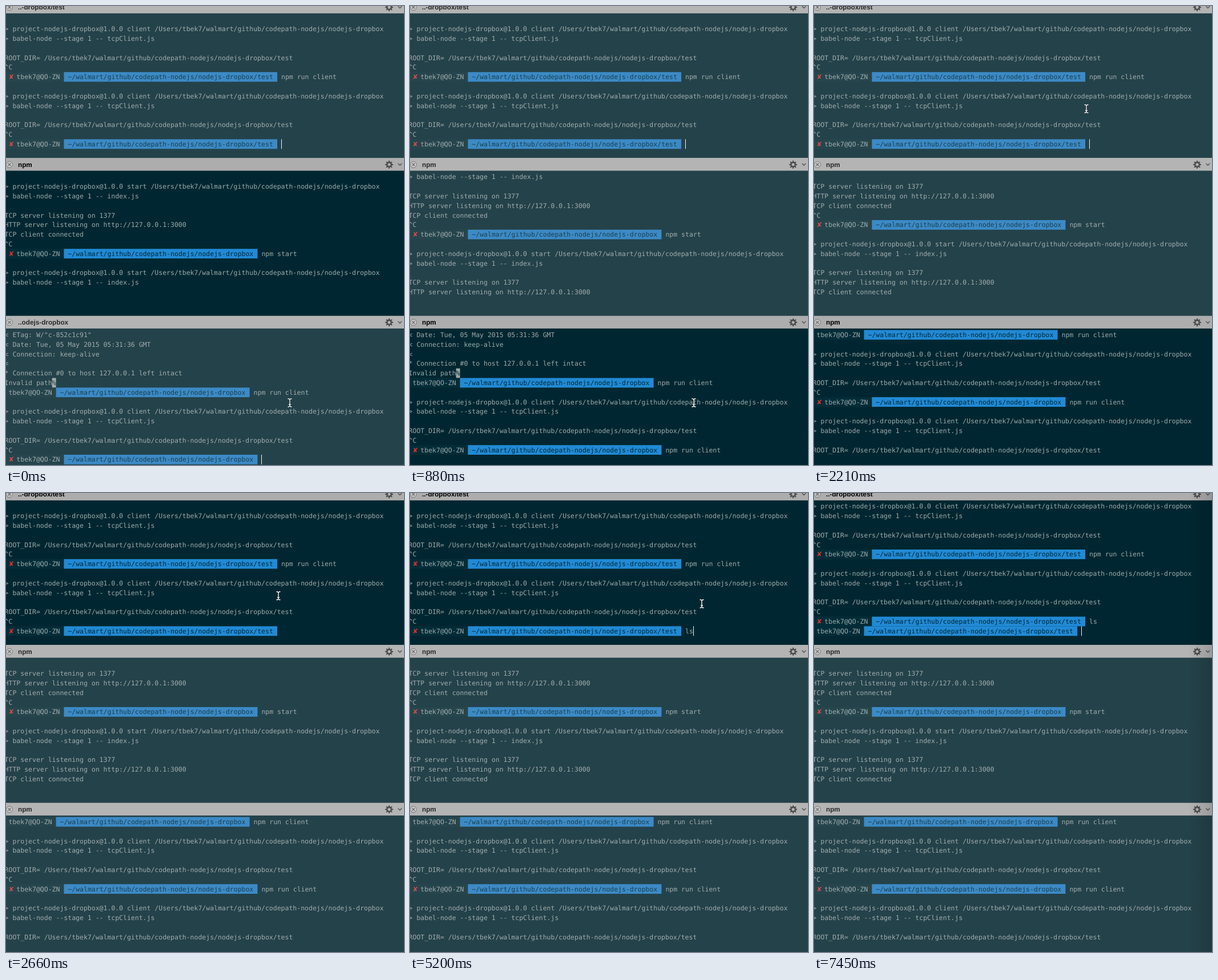
Recreate the animation shown at these times as an HTML page with a canvas. Size 697 by 804 pixels, loop 8000 ms.

```html
<!DOCTYPE html>
<html lang="en">
<head>
<meta charset="utf-8">
<title>Terminal panes</title>
<style>
html, body { margin: 0; width: 100%; height: 100%; overflow: hidden; background: #24424a; }
canvas { display: block; }
</style>
</head>
<body>
<canvas id="stage" width="697" height="804"></canvas>
<script>
const ctx = document.getElementById('stage').getContext('2d');
const W = 697, H = 804, LOOP = 8000;
const CELL = 6.92, LEFT = -2.4, ROW = 16.8, ROWS = 14;
const MONO = '11.494px "DejaVu Sans Mono", monospace';
const SYMBOL = '11.5px "DejaVu Sans", sans-serif';
const TITLE = 'bold 11.75px "Liberation Sans", Arial, sans-serif';

const ACTIVE = { bg: '#002731', user: '#022d38', text: '#9ba8a8', blue: '#218ad5', path: '#002a38', red: '#e32f2b', bar: '#adadad', title: '#000' };
const IDLE = { bg: '#24424a', user: '#26454d', text: '#a0acac', blue: '#3c8ac6', path: '#1a404f', red: '#d54a46', bar: '#b4b4b4', title: '#2a2a2a' };

const USER = 'tbek7@QO-ZN';
const REPO = '/walmart/github/codepath-nodejs/nodejs-dropbox';
const HOME = '/Users/tbek7';
const PATH = '~' + REPO;
const ROOT = `ROOT_DIR= ${HOME}${REPO}/test`;

const prompt = (failed, path, cmd = '') => ({ failed, path, cmd });
const run = (script, file) => ['', `> project-nodejs-dropbox@1.0.0 ${script} ${HOME}${REPO}`, `> babel-node --stage 1 -- ${file}`, ''];
const client = run('client', 'tcpClient.js');
const server = run('start', 'index.js');
const listening = ['TCP server listening on 1377', 'HTTP server listening on http://127.0.0.1:3000'];
const connected = 'TCP client connected';

// Latest entry whose time has been reached.
const at = (steps, t) => steps.reduce((found, step) => step[0] <= t ? step : found);

function topLines(t) {
  const typed = at([[0, ''], [5060, 'l'], [5200, 'ls']], t)[1];
  const lines = [...client, ROOT, '^C', prompt(true, PATH + '/test', 'npm run client'),
    ...client, ROOT, '^C', prompt(true, PATH + '/test', typed)];
  if (t >= 5950) lines.push(prompt(false, PATH + '/test'));
  return lines;
}

function middleLines(t) {
  const lines = [...server, ...listening, connected, '^C', prompt(true, PATH, 'npm start'), ...server];
  if (t >= 880) lines.push(...listening);
  if (t >= 2210) lines.push(connected);
  return [...lines, ''];
}

function bottomLines(t) {
  const lines = ['< ETag: W/"c-852c1c91"', '< Date: Tue, 05 May 2015 05:31:36 GMT', '< Connection: keep-alive', '<',
    '* Connection #0 to host 127.0.0.1 left intact', { text: 'Invalid path', mark: '%' },
    prompt(false, PATH, 'npm run client'), ...client, ROOT, '^C',
    prompt(true, PATH, t >= 440 ? 'npm run client' : '')];
  if (t >= 1330) lines.push(...client);
  if (t >= 2210) lines.push(ROOT);
  if (t >= 880) lines.push('');
  return lines;
}

const panes = [
  { top: 0, bottom: 266, barY: 2.2, firstRow: 23.4, lines: topLines, title: () => '..-dropbox/test',
    active: t => t >= 2660, caret: t => t < 2660 || t >= 3260 && t < 4310 || t >= 5060 },
  { top: 277, bottom: 543, barY: 277.8, firstRow: 299.4, lines: middleLines, title: () => 'npm',
    active: t => t < 290, caret: () => false },
  { top: 554, bottom: H, barY: 554.2, firstRow: 576, lines: bottomLines, title: t => t < 880 ? '..odejs-dropbox' : 'npm',
    active: t => t >= 290 && t < 2660, caret: t => t < 290 || t >= 440 && t < 880 }
];

const pointerSteps = [
  [0, 497, 695], [1330, 497, 660], [1480, 414, 306], [1770, 411, 185], [1920, 419, 128],
  [2060, 461, 144], [2210, 477, 180], [2960, 527, 183], [3110, 570, 195], [3260, 592, 216],
  [3560, 571, 213], [3710, 511, 194], [6400, 520, 193], [6550, 634, 191], [6700, -50, -50]
];

const colX = col => LEFT + col * CELL;

function rect(color, x, y, w, h) {
  ctx.fillStyle = color;
  ctx.fillRect(x, y, w, h);
}

function write(text, col, y, color, font = MONO) {
  ctx.font = font;
  ctx.fillStyle = color;
  ctx.fillText(text, colX(col), y + 4);
}

// Draws one row and returns the column after its last character.
function drawLine(line, y, look) {
  const top = y - ROW / 2;
  if (typeof line === 'string') {
    write(line, 0, y, look.text);
    return line.length;
  }
  if (line.mark) {
    const col = line.text.length;
    write(line.text, 0, y, look.text);
    rect(look.text, colX(col), top, CELL, ROW);
    write(line.mark, col, y, look.bg);
    return col + 1;
  }
  const userCol = line.failed ? 3 : 1;
  const blueCol = userCol + USER.length + 1;
  const blueLen = line.path.length + 2;
  const cmdCol = blueCol + blueLen + 1;
  rect(look.user, 0, top, colX(blueCol), ROW);
  if (line.failed) write('✘', 1, y, look.red, SYMBOL);
  write(USER, userCol, y, look.text);
  rect(look.blue, colX(blueCol), top, blueLen * CELL, ROW);
  write(line.path, blueCol + 1, y, look.path);
  write(line.cmd, cmdCol, y, look.text);
  return cmdCol + line.cmd.length;
}

function stroke(color, width, ...points) {
  ctx.strokeStyle = color;
  ctx.lineWidth = width;
  ctx.beginPath();
  points.forEach(([x, y], i) => i ? ctx.lineTo(x, y) : ctx.moveTo(x, y));
  ctx.stroke();
}

function drawGear(x, y) {
  for (let i = 0; i < 8; i++) {
    const a = i * Math.PI / 4, c = Math.cos(a), s = Math.sin(a);
    stroke('#4c4c4c', 2, [x + c * 4, y + s * 4], [x + c * 7, y + s * 7]);
  }
  ctx.lineWidth = 2.6;
  ctx.beginPath();
  ctx.arc(x, y, 3.8, 0, Math.PI * 2);
  ctx.stroke();
}

function drawBar(y, title, look) {
  rect(look.bar, 0, y - 11.5, W, 22.2);
  ctx.fillStyle = '#c4c4c4';
  ctx.strokeStyle = '#7c7c7c';
  ctx.lineWidth = 1;
  ctx.beginPath();
  ctx.arc(6, y, 5.5, 0, Math.PI * 2);
  ctx.fill();
  ctx.stroke();
  stroke('#666', 1.2, [3.6, y - 2.4], [8.4, y + 2.4]);
  stroke('#666', 1.2, [8.4, y - 2.4], [3.6, y + 2.4]);
  ctx.font = TITLE;
  ctx.fillStyle = look.title;
  ctx.fillText(title, 21, y + 4.2);
  drawGear(671, y);
  stroke('#555', 1.4, [686.5, y - 2], [689.8, y + 1.5], [693, y - 2]);
}

function drawPane(pane, t) {
  const look = pane.active(t) ? ACTIVE : IDLE;
  rect(look.bg, 0, pane.top, W, pane.bottom - pane.top);
  let y = 0, end = 0;
  pane.lines(t).slice(-ROWS).forEach((line, i) => {
    y = pane.firstRow + i * ROW;
    end = drawLine(line, y, look);
  });
  if (pane.caret(t)) rect('#f2f5f5', Math.round(colX(end)), y - ROW / 2, 1, ROW);
  drawBar(pane.barY, pane.title(t), look);
}

function drawPointer(x, y) {
  for (const [color, width] of [['#17282d', 2.6], ['#f0f3f3', 1.4]]) {
    for (const end of [-1, 1]) {
      const tip = y + end * 7, neck = y + end * 5.5;
      stroke(color, width, [x - 3.5, tip], [x - 1.5, tip], [x, neck], [x + 1.5, tip], [x + 3.5, tip]);
    }
    stroke(color, width, [x, y - 5.5], [x, y + 5.5]);
    stroke(color, width, [x - 2, y + 3], [x + 2, y + 3]);
  }
}

function drawEdgeShade() {
  const shade = ctx.createLinearGradient(655, 0, W, 0);
  shade.addColorStop(0, 'rgba(0, 0, 0, 0)');
  shade.addColorStop(1, 'rgba(0, 0, 0, 0.14)');
  rect(shade, 655, 0, W - 655, H);
}

function draw(now) {
  const t = now % LOOP;
  ctx.textRendering = 'geometricPrecision';
  panes.forEach(pane => drawPane(pane, t));
  const [, x, y] = at(pointerSteps, t);
  drawPointer(x, y);
  if (t >= 7450) drawEdgeShade();
}

const start = performance.now();
function tick() {
  draw(performance.now() - start);
  requestAnimationFrame(tick);
}
tick();
</script>
</body>
</html>
```
